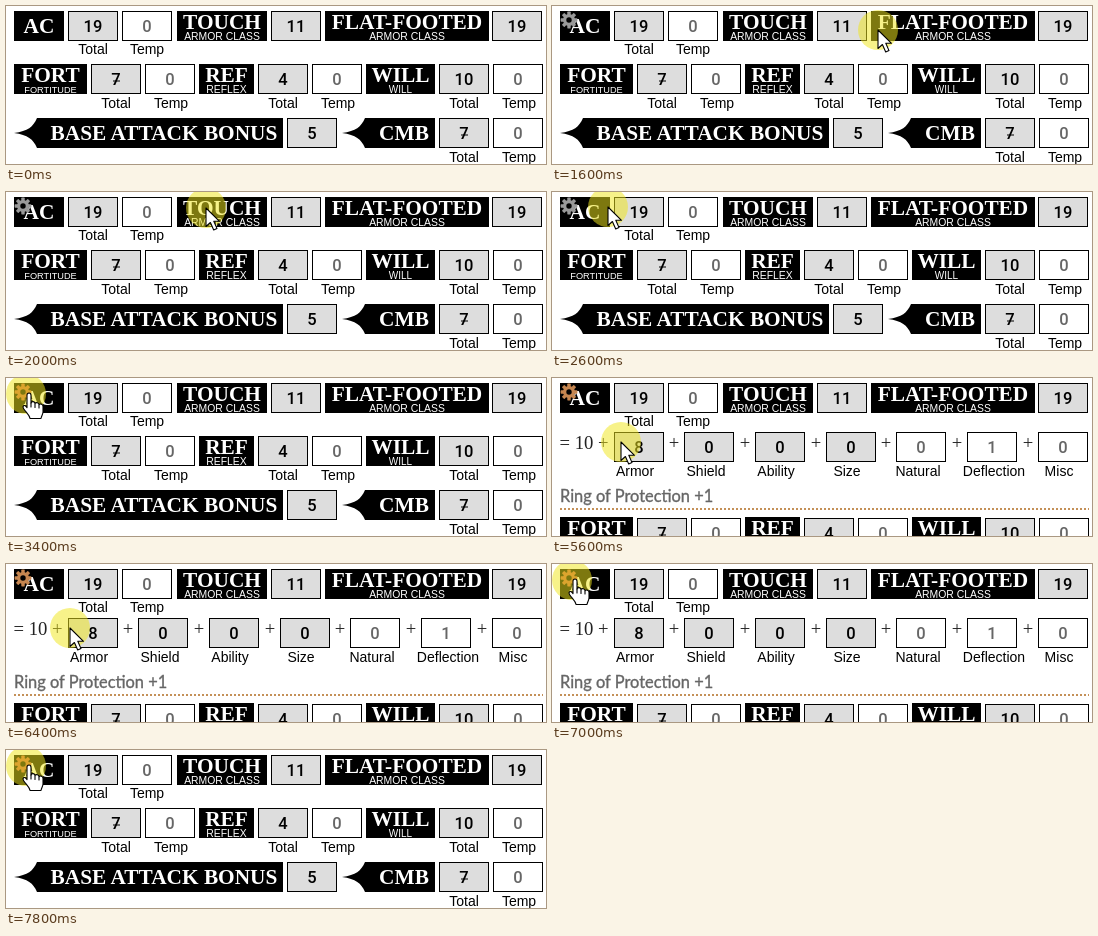
An HTML page that plays this animation: 540 px wide and 158 px high, repeating every 10000 ms.

```html
<!DOCTYPE html>
<html lang="en">
<head>
<meta charset="utf-8">
<title>Armor class panel</title>
<style>
  html, body { margin: 0; width: 100%; height: 100%; overflow: hidden; background: #fff; }
  svg { display: block; width: 540px; height: 158px; }
  text { text-anchor: middle; white-space: pre; }
  .head { font: bold 21.33px "Liberation Serif", "Times New Roman", serif; fill: #fff; }
  .sub { font-family: "Liberation Sans", Arial, sans-serif; fill: #fff; }
  .cap { font: 14px "Liberation Sans", Arial, sans-serif; }
  .num { font: 500 16.5px Roboto, sans-serif; }
  .sum { font: 18.67px "Liberation Serif", "Times New Roman", serif; fill: #222; }
  .note { font: 16.4px Lato, sans-serif; fill: #666; stroke: #666; stroke-width: .35; text-anchor: start; }
  #halo { fill: #f0e61e; fill-opacity: .52; }
  .cursor { fill: #fff; stroke: #000; stroke-width: 1.1; stroke-linejoin: round; stroke-linecap: round; }
</style>
</head>
<body>
<svg id="stage" viewBox="0 0 540 158"></svg>
<script>
const text = (cls, x, y, s, size) =>
  `<text class="${cls}" x="${x}" y="${y}"${size ? ` style="font-size:${size}px"` : ''}>${s}</text>`;

const cap = (x, y, s) => text('cap', x, y, s);

// Number field; open fields are white with grey digits
function field(x, y, value, open) {
  const ink = open ? '#666' : '#000';
  const bar = value === 7
    ? `<path d="M${x + 22} ${y + 17}h7" stroke="${ink}"/>` : '';
  return `<rect x="${x + .5}" y="${y + .5}" width="49" height="29" fill="${open ? '#fff' : '#ddd'}" stroke="#000"/>
    <g fill="${ink}">${text('num', x + 25, y + 21, value)}${bar}</g>`;
}

// Black label with an optional small second line
function label(x, y, w, title, sub, size) {
  const mid = x + w / 2;
  return `<rect x="${x}" y="${y}" width="${w}" height="30"/>` +
    text('head', mid, y + (sub ? 18 : 22), title) +
    (sub ? text('sub', mid, y + 28.5, sub, size) : '');
}

// Black label with a flared point on its left
function flared(x, y, right, title) {
  const edge = x + 26;
  return `<path d="M${x} ${y + 15}C${x + 14} ${y + 13} ${x + 19} ${y + 9} ${x + 23} ${y}H${right}v30H${x + 23}C${x + 19} ${y + 21} ${x + 14} ${y + 17} ${x} ${y + 15}z"/>` +
    text('head', (edge + right) / 2 + 2.5, y + 22, title);
}

const pair = (x, y, value, capY) =>
  field(x, y, value) + field(x + 54, y, 0, true) +
  cap(x + 25, capY, 'Total') + cap(x + 80, capY, 'Temp');

const armorRow = label(8, 5, 50, 'AC') +
  field(62, 5, 19) + field(116, 5, 0, true) + cap(87, 48, 'Total') + cap(141, 48, 'Temp') +
  label(171, 5, 90, 'TOUCH', 'ARMOR CLASS', 10.4) + field(265, 5, 11) +
  label(319, 5, 164, 'FLAT-FOOTED', 'ARMOR CLASS', 10.4) + field(486, 5, 19);

const saveRow = (y, fieldY = y) =>
  label(8, y, 73, 'FORT', 'FORTITUDE', 9.2) + pair(85, fieldY, 7, y + 44) +
  label(193, y, 55, 'REF', 'REFLEX', 10.4) + pair(252, fieldY, 4, y + 44) +
  label(360, y, 69, 'WILL', 'WILL', 10) + pair(433, fieldY, 10, y + 44);

const attackRow = flared(8, 112, 277, 'BASE ATTACK BONUS') + field(281, 112, 5) +
  flared(336, 112, 429, 'CMB') + pair(433, 112, 7, 156);

const parts = [
  ['Armor', 8, 83], ['Shield', 0, 154], ['Ability', 0, 224], ['Size', 0, 295],
  ['Natural', 0, 366, true], ['Deflection', 1, 442, true], ['Misc', 0, 507, true]
];
const detail = text('sum', 32, 71, '= 10 +') +
  parts.map(([name, value, mid, open], i) => {
    const x = Math.floor(62 + 70.7 * i);
    return (i ? text('sum', x - 10, 71, '+') : '') + field(x, 54, value, open) + cap(mid, 98, name);
  }).join('') +
  text('note', 8, 124, 'Ring of Protection +1') +
  '<path d="M8 131H537" stroke="#c49058" stroke-width="2" stroke-dasharray="2 2"/>';

const teeth = Array.from({ length: 8 }, (_, i) =>
  `<rect x="-1.7" y="-8.4" width="3.4" height="5" rx=".6" transform="rotate(${i * 45})"/>`).join('');

const stage = document.getElementById('stage');
stage.innerHTML = `<rect width="540" height="158" fill="#fff"/>
  ${armorRow}
  <g id="closed">${saveRow(58)}${attackRow}</g>
  <g id="open">${detail}${saveRow(139, 140)}</g>
  <circle id="halo" r="20"/>
  <g id="gear" transform="translate(17 14)">
    ${teeth}<path d="M-6 0a6 6 0 1 0 12 0a6 6 0 1 0-12 0M-2.7 0a2.7 2.7 0 1 1 5.4 0a2.7 2.7 0 1 1-5.4 0" fill-rule="evenodd"/>
  </g>
  <path id="arrow" class="cursor" d="M0 0V18.5L4.4 14.5L7.7 22L11 20.6L7.8 13.3H13.5z"/>
  <g id="hand" class="cursor">
    <path d="M0 1.2C0-1.8 4-1.8 4 1.2V9C4.5 7 8 7.2 8 9.6C8.8 8 12 8.4 12 10.8C13 9.4 16 10 16 12.4V18C16 20.5 14.5 21.5 14 24.5H3C2.5 21-1 18.5-3.5 14.5C-5 12-2.5 10.5-1 12.5L0 13.6z"/>
    <path fill="none" d="M4 9v4M8 10v3.5M12 11.3v2.7"/>
  </g>`;

// [ms, x, y]: the pointer jumps from place to place
const path = [
  [800, 335, 2], [1000, 335, 10], [1200, 334, 19], [1400, 332, 24], [1600, 326, 24],
  [1800, 272, 19], [2000, 200, 16], [2200, 130, 14], [2400, 82, 14], [2600, 56, 15],
  [2800, 42, 17], [3000, 33, 18], [3200, 25, 17], [3400, 20, 16],
  [5600, 69, 64], [5800, 84, 97], [6200, 80, 88], [6400, 64, 64],
  [6600, 43, 38], [6800, 27, 21], [7000, 20, 16]
];
// [ms, colour]
const gold = '#dca42e', red = '#f0542c', amber = '#e87c2c';
const tints = [
  [1000, '#999'], [3200, gold], [4000, red], [4200, amber], [4400, gold],
  [5600, '#c68650'], [6800, gold], [7400, red], [7600, amber], [7800, gold]
];

const at = (table, t) => table.filter(row => row[0] <= t).pop();
const el = id => document.getElementById(id);
const show = (id, on) => { el(id).style.display = on ? '' : 'none'; };

function draw(t) {
  const opened = t >= 4000 && t < 7400;
  show('open', opened);
  show('closed', !opened);

  const tint = at(tints, t);
  show('gear', tint);
  if (tint) el('gear').setAttribute('fill', tint[1]);

  const spot = at(path, t);
  const [, x, y] = spot || [0, 0, 0];
  const hand = x < 30 && y < 25;
  show('halo', spot);
  show('hand', spot && hand);
  show('arrow', spot && !hand);
  el('halo').setAttribute('transform', `translate(${x} ${y})`);
  el('arrow').setAttribute('transform', `translate(${x} ${y})`);
  el('hand').setAttribute('transform', `translate(${x + 1} ${y})`);
}

const start = performance.now();
function tick() {
  draw((performance.now() - start) % 10000);
  requestAnimationFrame(tick);
}
tick();
</script>
</body>
</html>
```
